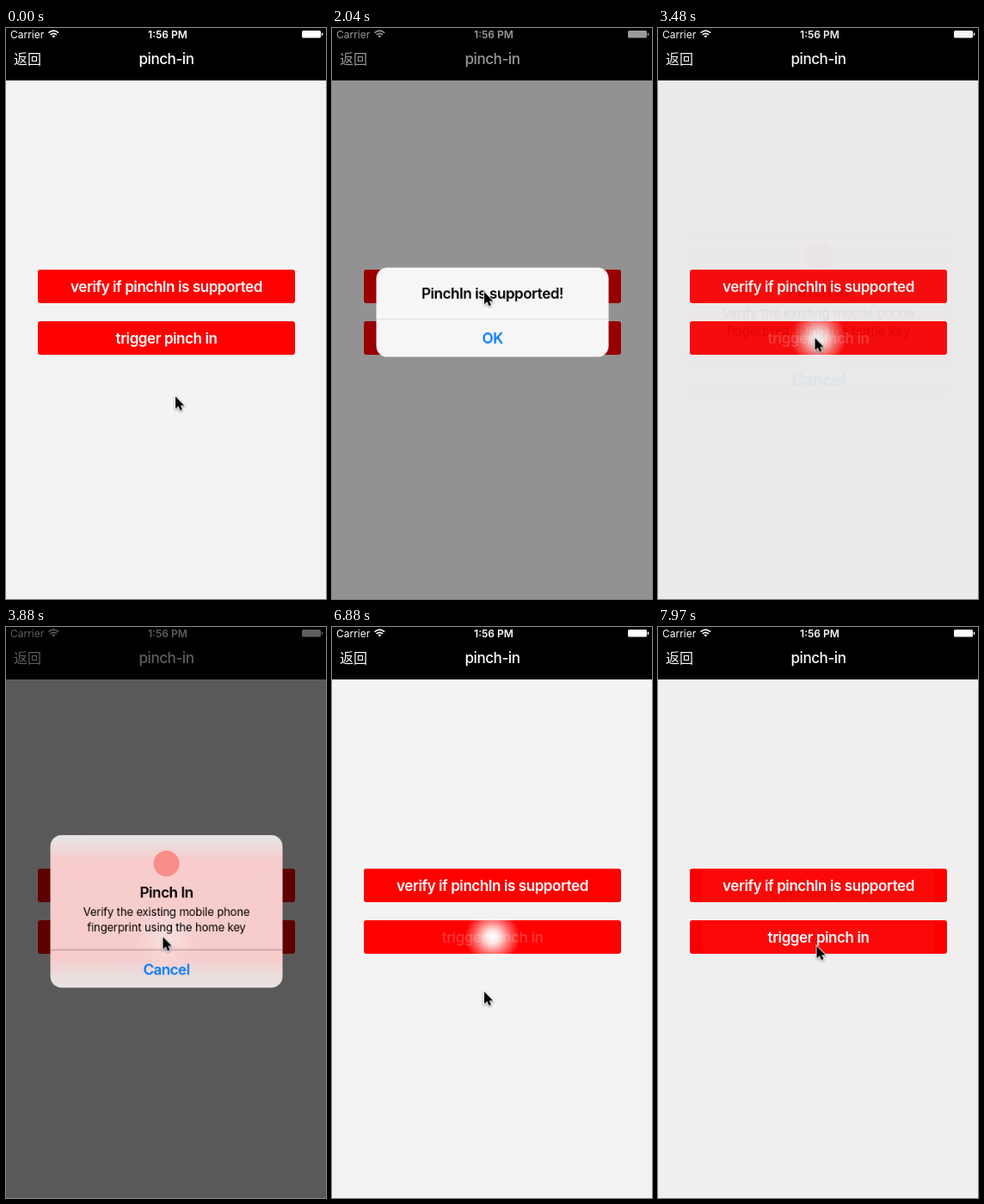
Write an HTML page that moves like this. It is 372 by 664 pixels and loops after 8 s.

```html
<!DOCTYPE html>
<html lang="en">
<head>
<meta charset="utf-8">
<title>pinch-in</title>
<style>
  html, body { margin: 0; width: 100%; height: 100%; overflow: hidden; background: #f3f3f3; }
  svg { display: block; width: 372px; height: 664px; }
  text { font-family: Inter, Roboto, "Noto Sans CJK SC", "Noto Sans CJK", sans-serif; font-size: 17px; letter-spacing: -.42px; }
  .mid { text-anchor: middle; }
  .status { font-size: 12px; letter-spacing: 0; }
  .medium { font-weight: 500; }
  .bold { font-weight: 600; }
  .body { font-size: 13px; letter-spacing: -.12px; }
  .link { fill: #007aff; letter-spacing: -.55px; }
  .button { width: 299px; height: 39px; }
  .button text { font-weight: 600; fill: #fff; }
  .glow, .dim, .panel { opacity: 0; }
  .panel { transform-origin: 186.5px 330.5px; }
</style>
</head>
<body>
<svg viewBox="0 0 372 664">
  <defs>
    <radialGradient id="glow">
      <stop offset="0" stop-color="#fff"/>
      <stop offset=".25" stop-color="#fff" stop-opacity=".88"/>
      <stop offset=".65" stop-color="#fff" stop-opacity=".38"/>
      <stop offset="1" stop-color="#fff" stop-opacity="0"/>
    </radialGradient>
    <linearGradient id="frost" gradientUnits="userSpaceOnUse" x1="0" x2="0" y1="220" y2="442">
      <stop offset="0" stop-color="#e8e8e8"/>
      <stop offset=".12" stop-color="#eae4e4"/>
      <stop offset=".23" stop-color="#f9cdcd"/>
      <stop offset=".74" stop-color="#f8cdcd"/>
      <stop offset=".84" stop-color="#ecdfdf"/>
      <stop offset="1" stop-color="#e8e8e8"/>
    </linearGradient>
  </defs>

  <rect width="372" height="664" fill="#f3f3f3"/>
  <rect width="372" height="61"/>
  <g fill="#fff">
    <text class="status" x="5" y="11.5">Carrier</text>
    <text class="status bold mid" x="188" y="11.5">1:56 PM</text>
    <path d="M49.5 5.6Q55.3 .8 61.1 5.6M51.6 7.9Q55.3 4.8 59 7.9" fill="none" stroke="#fff" stroke-width="1.6"/>
    <path d="M53.3 9.3Q55.3 7.8 57.3 9.3L55.3 11.5Z"/>
    <rect x="344" y="3" width="22" height="8.5" rx="1.5"/>
    <rect x="366.8" y="5.5" width="1.4" height="3.4" rx=".7"/>
    <text x="9" y="41.5" style="font-size:16px;letter-spacing:0">返回</text>
    <text class="medium mid" x="186.5" y="41.7">pinch-in</text>
  </g>

  <g id="buttons"></g>
  <g id="overlays"></g>
  <g id="cursor" style="filter:drop-shadow(0 1px 1px #0006)">
    <path d="M0 0V14.3L3.3 11.3L5.5 16.2L8 15.1L5.8 10.4H10.3Z" stroke="#fff" stroke-width="1.6" paint-order="stroke"/>
  </g>
</svg>
<script>
const LOOP = 8000;
const CENTER = 186.5;
const byId = id => document.getElementById(id);

// steps: [time in ms, style, easing]
const play = (el, steps) => el.animate(
  steps.map(([time, style, easing = 'linear']) => ({ offset: time / LOOP, easing, ...style })),
  { duration: LOOP, iterations: Infinity });

const label = (y, text, cls, x = CENTER) => `<text class="mid ${cls}" x="${x}" y="${y}">${text}</text>`;
const line = (y, color) => `<rect x="51.5" y="${y}" width="270" height="1" fill="${color}"/>`;
const card = (y, height, fill) =>
  `<rect x="51.5" y="${y}" width="270" height="${height}" rx="13" fill="${fill}"/>`;

function addButton(y, text, press, release) {
  byId('buttons').insertAdjacentHTML('beforeend', `
    <svg class="button" x="37" y="${y}">
      <rect width="299" height="39" rx="3" fill="#f00"/>
      ${label(25.8, text, '', 149.5)}
      <circle class="glow" cx="149.5" cy="19.5" r="32" fill="url(#glow)"/>
    </svg>`);
  const button = byId('buttons').lastElementChild;
  const hold = (selector, off, on) => play(button.querySelector(selector), [
    [0, { opacity: off }], [press, { opacity: off }], [press + 130, { opacity: on }],
    [release, { opacity: on }], [release + 200, { opacity: off }], [LOOP, { opacity: off }]]);
  hold('text', 1, .2);
  hold('.glow', 0, 1);
}

// Critically damped spring, sampled from `start`; appearing is quicker than leaving
function spring(start, to, style) {
  const count = 14, gap = 30, omega = to ? .025 : .0183;
  return Array.from({ length: count + 1 }, (_, i) => {
    const x = omega * i * gap;
    const rest = i === count ? 0 : (1 + x) * Math.exp(-x);
    return [start + i * gap, style(to ? 1 - rest : rest)];
  }).filter(([time]) => time <= LOOP);
}

function addOverlay(content, dim, show, hide) {
  byId('overlays').insertAdjacentHTML('beforeend', `
    <g>
      <rect class="dim" width="372" height="664" fill-opacity="${dim}"/>
      <g class="panel">${content}</g>
    </g>`);
  const [shade, panel] = byId('overlays').lastElementChild.children;
  const fade = opacity => ({ opacity });
  const fadeOut = spring(hide, 0, fade);
  const steps = [[0, fade(0)], ...spring(show, 1, fade), ...fadeOut, [LOOP, fadeOut.at(-1)[1]]];
  play(shade, steps);
  play(panel, steps);

  const zoom = value => ({ transform: `scale(${1.17 - .17 * value})` });
  play(panel, [[0, zoom(0)], ...spring(show, 1, zoom), [LOOP, zoom(1)]]);
}

const alertCard = title => card(278.5, 104, '#f8f8f8') + line(338, '#dcdcdf')
  + label(314.7, title, 'bold') + label(367.2, 'OK', 'bold link');

function promptCard(id, top, title, actions) {
  const rows = actions.map(([text, cls], i) =>
    line(top + 133 + i * 45, '#ad8c8c') + label(top + 162.2 + i * 44, text, cls)).join('');
  return `<g id="${id}">
    ${card(top, 133 + actions.length * 44.25, 'url(#frost)')}
    <circle cx="${CENTER}" cy="360" r="38" fill="url(#glow)" opacity=".35"/>
    <circle cx="${CENTER}" cy="${top + 33}" r="15" fill="#fa8e88"/>
    ${label(top + 73, title, 'bold')}
    ${label(top + 94, 'Verify the existing mobile phone', 'body')}
    ${label(top + 112, 'fingerprint using the home key', 'body')}
    ${rows}
  </g>`;
}

addButton(281, 'verify if pinchIn is supported', 1260, 1750);
addButton(341, 'trigger pinch in', 3110, 6890);

const cancel = ['Cancel', 'bold link'];
addOverlay(alertCard('PinchIn is supported!'), .4, 1740, 2350);
addOverlay(
  promptCard('ask', 242, 'Pinch In', [cancel])
  + promptCard('retry', 220, 'Try Again', [['Verify Password', 'link'], cancel]),
  .63, 3470, 6340);
addOverlay(alertCard('User canceled'), .4, 6890, 7690);

const swap = (id, before, after) => play(byId(id), [
  [0, { opacity: before }], [5550, { opacity: before }],
  [5550, { opacity: after }], [LOOP, { opacity: after }]]);
swap('ask', 1, 0);
swap('retry', 0, 1);

const path = [
  [0, 197, 428.5], [520, 197, 428.5], [860, 158, 261], [1110, 177, 307],
  [2100, 177, 307], [2320, 184.5, 350], [2680, 184.5, 350], [2900, 182.5, 360.5],
  [5600, 182.5, 360.5], [6290, 177, 424], [7080, 177, 424], [7500, 184.5, 371], [LOOP, 184.5, 371],
];
play(byId('cursor'), path.map(([time, x, y]) =>
  [time, { transform: `translate(${x}px, ${y}px)` }, 'ease-in-out']));
</script>
</body>
</html>
```
